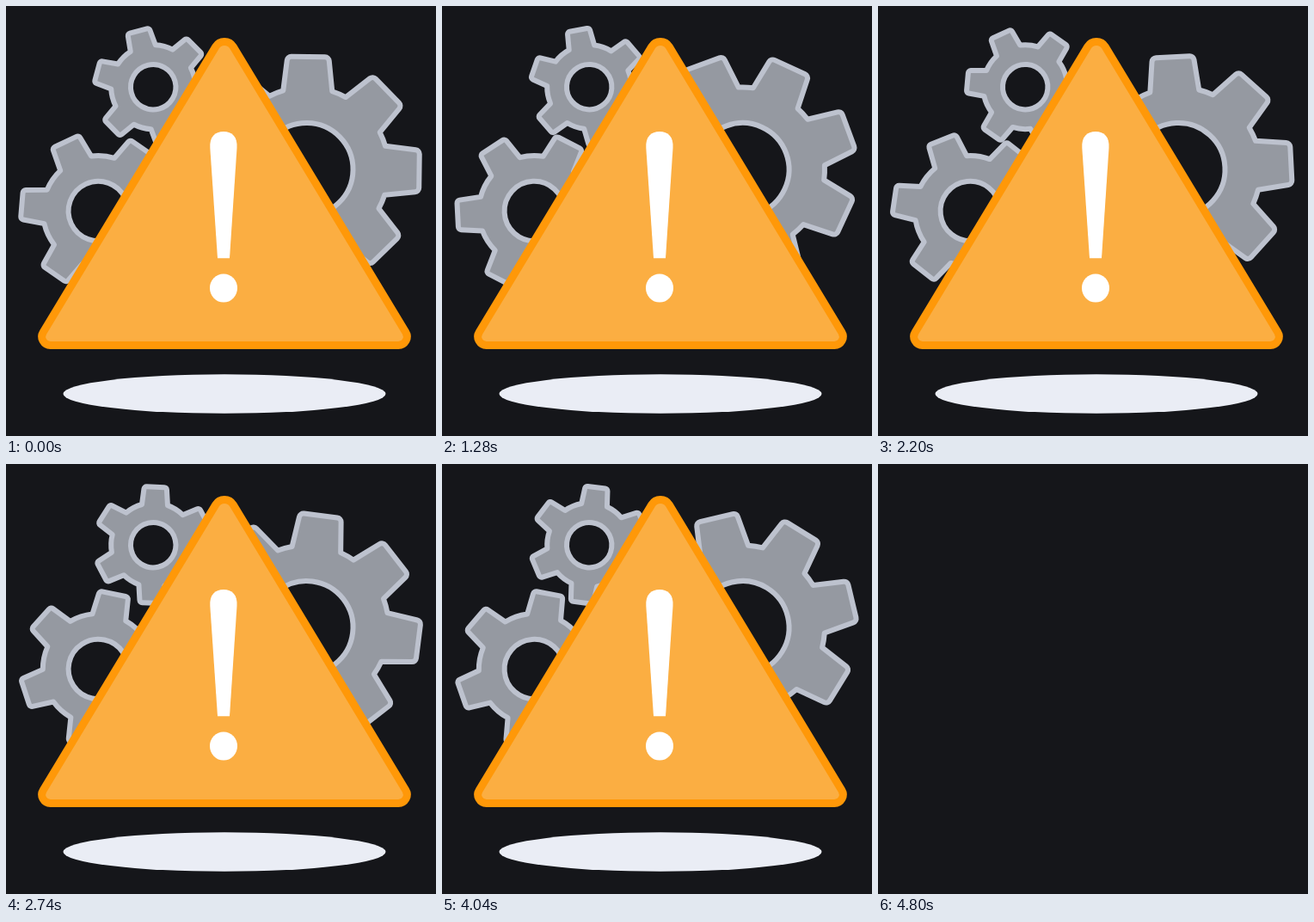
Recreate the animation shown at these times as an HTML page with a canvas. Size 500 by 500 pixels, loop 4.82 s.

```html
<!DOCTYPE html>
<html lang="en">
<head>
<meta charset="utf-8">
<title>Warning gears</title>
<style>
  html, body { margin: 0; width: 100%; height: 100%; overflow: hidden; background: #15161a; }
  canvas { display: block; width: 500px; height: 500px; }
</style>
</head>
<body>
<canvas id="stage" width="500" height="500"></canvas>
<script>
const ctx = document.getElementById('stage').getContext('2d');
const LOOP = 4820, SPIN = 4800, STEP = 20;
const TAU = Math.PI * 2;

// Radii and half-widths run along the middle of the outline.
const bigGear = { x: 349.5, y: 190, teeth: 8, tip: 131, root: 95.5, tipHalf: 24, rootHalf: 28.5, hole: 54, corner: 5 };
const midGear = { x: 107.3, y: 238.5, teeth: 6, tip: 89.2, root: 64.5, tipHalf: 17, rootHalf: 19.8, hole: 34.7, corner: 3.5 };
const smallGear = { x: 171.2, y: 94.2, teeth: 6, tip: 67.5, root: 49, tipHalf: 13, rootHalf: 15, hole: 26.2, corner: 3 };

function gearPath(g) {
  const path = new Path2D();
  const pitch = TAU / g.teeth;
  const rootAngle = Math.asin(g.rootHalf / g.root);
  for (let i = 0; i < g.teeth; i++) {
    const a = i * pitch;
    const cos = Math.cos(a), sin = Math.sin(a);
    // Offset across the tooth and distance out from the hub; zero points up.
    const at = (across, out) => [across * cos + out * sin, across * sin - out * cos];
    const rootOut = g.root * Math.cos(rootAngle);
    const left = at(-g.tipHalf, g.tip), right = at(g.tipHalf, g.tip);
    const end = at(g.rootHalf, rootOut);
    if (i === 0) path.moveTo(...at(-g.rootHalf, rootOut));
    path.arcTo(...left, ...right, g.corner);
    path.arcTo(...right, ...end, g.corner);
    path.lineTo(...end);
    const up = a - TAU / 4;
    path.arc(0, 0, g.root, up + rootAngle, up + pitch - rootAngle);
  }
  path.closePath();
  path.moveTo(g.hole, 0);
  path.arc(0, 0, g.hole, 0, TAU);
  return path;
}

for (const g of [bigGear, midGear, smallGear]) g.path = gearPath(g);

function drawGear(g, degrees) {
  ctx.save();
  ctx.translate(g.x, g.y);
  ctx.rotate(degrees * TAU / 360);
  ctx.fillStyle = '#9599a1';
  ctx.fill(g.path, 'evenodd');
  ctx.strokeStyle = '#bdc2ce';
  ctx.lineWidth = 6;
  ctx.lineJoin = 'round';
  ctx.stroke(g.path);
  ctx.restore();
}

function drawEllipse(x, y, rx, ry, color) {
  ctx.beginPath();
  ctx.ellipse(x, y, rx, ry, 0, 0, TAU);
  ctx.fillStyle = color;
  ctx.fill();
}

function drawTriangle() {
  ctx.beginPath();
  ctx.moveTo(254, 394.5);
  ctx.arcTo(34, 394.5, 254, 30.4, 10);
  ctx.arcTo(254, 30.4, 474, 394.5, 12);
  ctx.arcTo(474, 394.5, 254, 394.5, 10);
  ctx.closePath();
  ctx.fillStyle = '#fbae42';
  ctx.fill();
  ctx.strokeStyle = '#ff9808';
  ctx.lineWidth = 9;
  ctx.stroke();
}

const bar = new Path2D('M246 293.3 L237.3 165 C236.5 152 243 146 253 146 S269.3 152 268.5 165 L260 293.3 Z');

function draw(t) {
  ctx.fillStyle = '#15161a';
  ctx.fillRect(0, 0, 500, 500);
  if (t >= SPIN) return;

  const p = t / SPIN;
  // The middle gear turns slightly faster in the first half.
  const midTurn = p < 0.5 ? -254 * p : -127 - 226 * (p - 0.5);
  drawGear(bigGear, 0.8 + 90 * p);
  drawGear(midGear, -25.2 + midTurn);
  drawGear(smallGear, -14.8 + 240 * p);

  drawTriangle();
  ctx.fillStyle = '#fff';
  ctx.fill(bar);
  drawEllipse(253, 328, 16, 16.6, '#fff');
  drawEllipse(254, 451, 187.5, 22.8, '#eaedf5');
}

const start = performance.now();
function tick() {
  const t = (performance.now() - start) % LOOP;
  draw(Math.floor(t / STEP) * STEP);
  requestAnimationFrame(tick);
}
tick();
</script>
</body>
</html>
```
